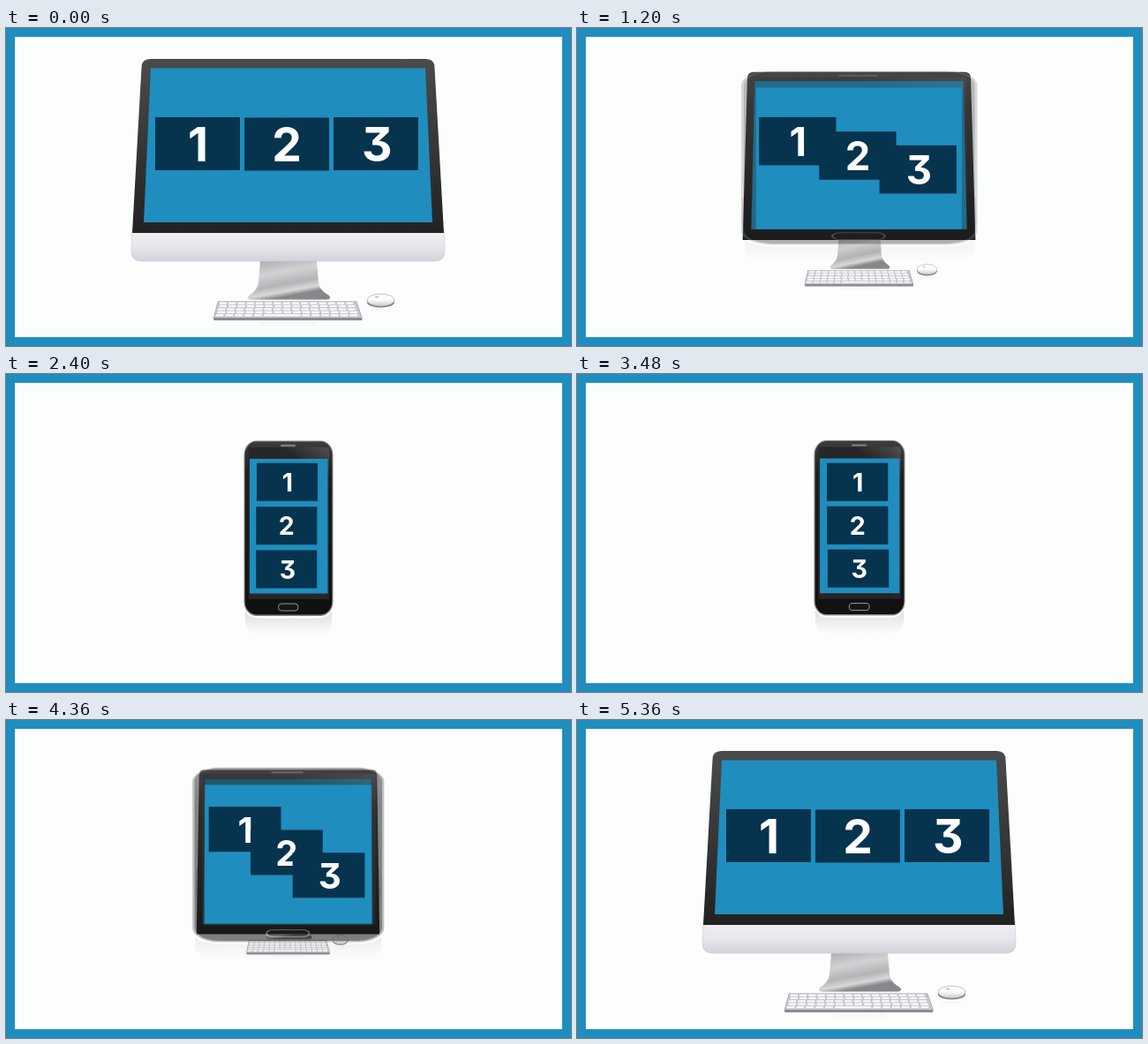
Recreate the animation shown at these times as an HTML page. Size 640x360 px, loop 5800 ms.

```html
<!DOCTYPE html>
<html lang="en">
<head>
<meta charset="utf-8">
<title>Responsive layout</title>
<style>
  html, body { margin: 0; width: 100%; height: 100%; overflow: hidden; background: #fcfefe; }
  svg { display: block; width: 100vw; height: 100vh; }
  text {
    font-family: Inter, "Open Sans", sans-serif;
    font-weight: 700;
    font-feature-settings: "cv09";
    text-anchor: middle;
    fill: #fff;
  }
</style>
</head>
<body>
<svg viewBox="0 0 640 360">
  <defs>
    <linearGradient id="bezel" x1="0" y1="0" x2="0" y2="1">
      <stop offset="0" stop-color="#4b4b4c"/><stop offset="1" stop-color="#222223"/>
    </linearGradient>
    <linearGradient id="chinFill" x1="0" y1="0" x2="0" y2="1">
      <stop offset="0" stop-color="#f1f1f5"/><stop offset=".6" stop-color="#e5e5eb"/>
      <stop offset="1" stop-color="#d2d2da"/>
    </linearGradient>
    <linearGradient id="standFill" x1="0" y1="0" x2=".25" y2="1">
      <stop offset=".35" stop-color="#acacb0"/><stop offset=".6" stop-color="#d2d2d5"/>
      <stop offset=".8" stop-color="#b4b4b8"/><stop offset=".92" stop-color="#d8d8da"/>
      <stop offset="1" stop-color="#88888c"/>
    </linearGradient>
    <linearGradient id="mouseFill" x1="0" y1="0" x2="0" y2="1">
      <stop offset=".5" stop-color="#fbfbfc"/><stop offset="1" stop-color="#c9c9ce"/>
    </linearGradient>
    <linearGradient id="body" x1="0" y1="0" x2="0" y2="1">
      <stop offset="0" stop-color="#3c3c3d"/><stop offset=".2" stop-color="#1d1d1e"/>
      <stop offset="1" stop-color="#101011"/>
    </linearGradient>
    <linearGradient id="glass" x1="1" y1="0" x2=".6" y2="1">
      <stop offset="0" stop-color="#505051"/><stop offset=".2" stop-color="#272728"/>
      <stop offset="1" stop-color="#262627"/>
    </linearGradient>
    <linearGradient id="fade" x1="0" y1="0" x2="0" y2="1">
      <stop offset="0" stop-color="#777" stop-opacity=".25"/>
      <stop offset="1" stop-color="#999" stop-opacity="0"/>
    </linearGradient>
  </defs>

  <rect width="640" height="360" fill="#1f8dbe"/>
  <rect x="10" y="10" width="620" height="340" fill="#fcfefe"/>

  <g id="scene">
    <g id="desk">
      <path d="M288 240H352V264L354 288Q355 296 363 301Q367 303 367 305Q367 307.500 363 307.500H278Q274 307.500 274 305Q274 303 278 301Q285 296 286 288L288 264Z" fill="url(#standFill)"/>
      <rect x="289" y="332" width="62" height="7" fill="url(#fade)" opacity=".25"/>
      <path d="M240 309H397L403.500 328V329.500Q403.500 331 401.500 331H237Q235 331 235 329.500V328Z" fill="#8b8b91"/>
      <path d="M240.500 309H396.500L403 328H235.500Z" fill="#c6c6cd"/>
      <path id="keys" fill="#fafafc"/>
      <ellipse cx="424.500" cy="310.500" rx="15.500" ry="6" fill="#78787d"/>
      <ellipse cx="424.500" cy="308" rx="15.500" ry="7" fill="url(#mouseFill)" stroke="#a9a9ae" stroke-width=".7"/>
      <ellipse cx="420" cy="304.500" rx="2" ry=".9" fill="#b9b9be"/>
      <path d="M411 318H438L434 324H415Z" fill="url(#fade)" opacity=".2"/>
    </g>

    <path id="chin" d="M143 226H496L497 253Q497 264 485 264H154Q142 264 142 253Z" fill="url(#chinFill)" stroke="#c8c8d0" stroke-width=".6"/>

    <path id="head" fill="url(#bezel)"/>
    <path id="panel" fill="#1f8dbe"/>

    <g id="phone">
      <g id="shell">
        <path d="M271 268Q274 276 286 276.500H354Q366 276 369 268V282Q366 294 354 297H286Q274 294 271 282Z" fill="url(#fade)"/>
        <rect x="269.500" y="75.500" width="101" height="198.500" rx="14" ry="16" fill="#8a8a8b"/>
        <rect x="270.600" y="76.500" width="98.800" height="196" rx="13" ry="15" fill="url(#body)"/>
        <rect x="274.500" y="83" width="91.500" height="172" rx="1" fill="url(#glass)"/>
        <rect x="311" y="79.800" width="17" height="2.400" rx="1.200" fill="#7d7d7e"/>
        <rect x="308.500" y="260" width="22.500" height="8" rx="3.800" fill="#151516" stroke="#949495" stroke-width="1"/>
      </g>
      <rect id="screen" fill="#1f8dbe"/>
    </g>

    <g id="cards"></g>
  </g>
</svg>
<script>
const NS = "http://www.w3.org/2000/svg";
const LOOP = 5800, STEP = 40, TURN = 3360;
const $ = id => document.getElementById(id);
const mix = (a, b, p) => a + (b - a) * p;
const mixBox = (a, b, p) => a.map((v, i) => mix(v, b[i], p));
const ease = u => {
  u = Math.min(1, Math.max(0, u));
  return u * u * (3 - 2 * u);
};

// 0 = desktop layout, 1 = phone layout
function progress(t) {
  if (t < TURN) return ease((t - 465) / 1935);
  return 1 - ease(Math.pow((t - 3350) / 2000, 1.07));
}

function add(parent, tag, attrs) {
  const el = document.createElementNS(NS, tag);
  set(el, attrs);
  parent.appendChild(el);
  return el;
}

function set(el, attrs) {
  for (const k in attrs) el.setAttribute(k, attrs[k]);
}

// Scale an element so that box a lands on box b; boxes are [left, top, right, bottom]
function fit(el, a, b) {
  const sx = (b[2] - b[0]) / (a[2] - a[0]);
  const sy = (b[3] - b[1]) / (a[3] - a[1]);
  el.setAttribute("transform",
    `matrix(${sx} 0 0 ${sy} ${b[0] - a[0] * sx} ${b[1] - a[1] * sy})`);
}

function keyPath() {
  let d = "";
  for (let r = 0; r < 5; r++) {
    const y = 310.4 + r * 3.4;
    const left = 242 - r * 1.05, right = 395.5 + r * 1.25;
    const w = (right - left) / 15;
    for (let c = 0; c < 15; c++) {
      if (r === 4 && c > 4 && c < 9) continue;
      d += `M${left + c * w + (r % 2) * 0.8} ${y}h${w - 2.1}l-.2 2.3h${2.1 - w}z`;
    }
    if (r === 4) d += `M${left + 5 * w} ${y}h${4 * w - 2}v2.3h${2 - 4 * w}z`;
  }
  return d;
}
$("keys").setAttribute("d", keyPath());

// Card centres in both layouts
const cards = [
  { wide: [217, 131], tall: [318.5, 122.3], dx: 0.5 },
  { wide: [318, 131.5], tall: [317.8, 171.7], dx: 0 },
  { wide: [419, 131], tall: [317.7, 221], dx: 1.2 }
].map((c, i) => {
  c.box = add($("cards"), "rect", { fill: "#06334e" });
  c.label = add($("cards"), "text", {});
  c.label.textContent = i + 1;
  return c;
});

const PHONE_WIDE = [146, 35, 493, 232], PHONE = [269.5, 75, 370.5, 274];
const SCREEN_WIDE = [168, 54, 470, 218], SCREEN = [276, 96, 364.5, 248.5];

// Monitor front: its sides straighten as it narrows
function drawHead(p, l, r) {
  const top = 35 + 46 * p, bottom = 232 + 25 * p;
  const s = (r - l) / 353, lean = 10.5 * (1 - p), c = 10 * s;
  const a = l + lean * s, b = r - lean * s;
  $("head").setAttribute("d",
    `M${a + c} ${top}H${b - c}Q${b} ${top} ${b} ${top + c}L${r} ${bottom}H${l}L${a} ${top + c}Q${a} ${top} ${a + c} ${top}Z`);
  const edge = 13 * s, slant = 8 * s * (1 - p);
  const y0 = top + 10.5, y1 = bottom - 12;
  $("panel").setAttribute("d",
    `M${l + edge + slant} ${y0}H${r - edge - slant}L${r - edge} ${y1}H${l + edge}Z`);
}

function draw(t) {
  const p = progress(t);

  // The way back arcs slightly upwards
  const lift = t < TURN ? 0 : 11 * p * (1 - p);
  $("scene").setAttribute("transform", `translate(0 ${-lift})`);

  const left = 143 + 138 * p, right = 496 - 138 * p;
  drawHead(p, left, right);
  fit($("chin"), [143, 0, 496, 1], [left, -105 * p, right, 1 - 105 * p]);

  const sx = 1 - 0.83 * p, sy = 1 - 0.5 * p;
  $("desk").setAttribute("transform",
    `translate(320 ${307 - 107 * p}) scale(${sx} ${sy}) translate(-320 -307)`);

  fit($("shell"), PHONE, mixBox(PHONE_WIDE, PHONE, p));
  const [x0, y0, x1, y1] = mixBox(SCREEN_WIDE, SCREEN, p);
  set($("screen"), { x: x0, y: y0, width: x1 - x0, height: y1 - y0 });
  $("phone").setAttribute("opacity", p);

  const w = mix(96, 69, p), h = mix(60, 43, p), size = mix(53.5, 28.5, p);
  for (const c of cards) {
    const x = mix(c.wide[0], c.tall[0], p), y = mix(c.wide[1], c.tall[1], p);
    set(c.box, { x: x - w / 2, y: y - h / 2, width: w, height: h });
    set(c.label, { x: x + c.dx, y: y + size * 0.364 + 0.3, "font-size": size });
  }
}

const start = performance.now();
function tick() {
  const t = (performance.now() - start) % LOOP;
  draw(Math.floor(t / STEP) * STEP);
  requestAnimationFrame(tick);
}
draw(0);
requestAnimationFrame(tick);
</script>
</body>
</html>
```
